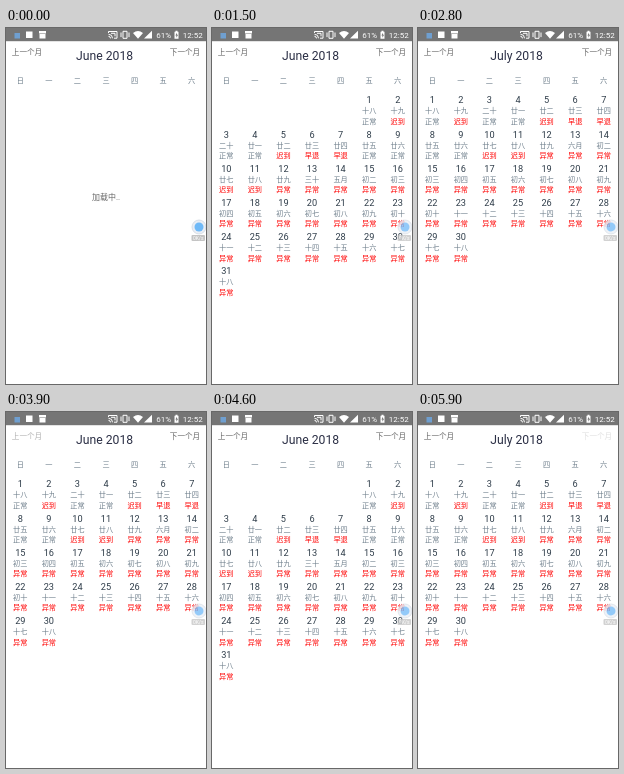
These frames come from a looping animation (200 px wide and 356 px high, 6000 ms). An HTML page:

```html
<!DOCTYPE html>
<html lang="zh-CN">
<head>
<meta charset="utf-8">
<title>Calendar</title>
<style>
html, body { margin: 0; width: 100%; height: 100%; overflow: hidden; background: #fff; }
svg { display: block; width: 100vw; height: 100vh; }
text { font: 7.2px Roboto, "Noto Sans CJK SC", "Noto Sans CJK", sans-serif; fill: #6f7f8c; text-anchor: middle; }
.bar text { font-size: 8px; fill: #fff; }
text.title { font-size: 12.2px; fill: #2b2f45; }
text.nav { font-size: 7.6px; fill: #666; }
text.wait { font-size: 8px; fill: #666; }
text.day { font-size: 9.2px; fill: #2d3b48; }
text.late { fill: #f00; }
text.speed { font-size: 5px; fill: #fff; }
</style>
</head>
<body>
<svg viewBox="0 0 200 356">
  <g class="bar" fill="#fff">
    <rect width="200" height="13.2" fill="#757575"/>
    <rect x="8.5" y="5" width="5.5" height="5.5" fill="#6f9fd0"/>
    <rect x="20" y="3.5" width="6.5" height="6.5"/>
    <path d="M33 3h7v2.4h-7zM33.5 6h6v4.6h-6z"/>
    <g fill="none" stroke="#fff">
      <path d="M102.5 5V3.5h8.5v6.7h-3M102.5 6.3a4 4 0 0 1 4 4M102.5 8.4a2 2 0 0 1 2 2M105 5.3h4v3"/>
      <path d="M117 3.3h4v7h-4zM115 4.5v4.6M123 4.5v4.6"/>
    </g>
    <path d="M127 5q5-4 10 0l-5 5.8zM146 2.8v7.8h-8zM168.5 3.8h1v-1h2v1h1v7h-4z"/>
    <path d="M171 4.7l-1.6 2.7h1v2.3l1.7-3h-1.1z" fill="#757575"/>
    <text x="157.6" y="9.8">61%</text>
    <text x="186.8" y="9.8">12:52</text>
  </g>
  <text class="nav" id="prev" x="21" y="27">上一个月</text>
  <text class="nav" id="next" x="179" y="27">下一个月</text>
  <text class="title" id="title" x="98.6" y="32"></text>
  <text class="wait" id="wait" x="100" y="172">加载中..</text>
  <g id="week"></g>
  <g id="june"></g>
  <g id="july"></g>
  <g id="ball">
    <circle cx="193" cy="199" r="7" fill="#e9eef5" stroke="#cdd5de" stroke-width=".7"/>
    <circle cx="193" cy="199" r="4.5" fill="#6fb9f7"/>
    <rect x="185.5" y="207" width="13.5" height="6" rx="1" fill="#c4c4c4"/>
    <text class="speed" x="192.2" y="211.8">0K/s</text>
  </g>
</svg>
<script>
const $ = id => document.getElementById(id);
const colX = col => 14.3 + 28.57 * col;

function label(parent, text, x, y, cls = '') {
  const el = document.createElementNS('http://www.w3.org/2000/svg', 'text');
  el.textContent = text;
  el.setAttribute('x', x);
  el.setAttribute('y', y);
  el.setAttribute('class', cls);
  parent.append(el);
}

const digits = '十一二三四五六七八九';

function lunarName(n) {
  if (n === 10) return '初十';
  if (n === 20) return '二十';
  if (n === 30) return '三十';
  return '初十廿'[Math.floor(n / 10)] + digits[n % 10];
}

// The lunar month turns over on day `turn`
function lunar(day, turn, name) {
  if (day === turn) return name;
  return lunarName(day < turn ? day + 17 : day - turn + 1);
}

function status(day) {
  if (day > 11) return '异常';
  if ([2, 5, 10, 11].includes(day)) return '迟到';
  return day === 6 || day === 7 ? '早退' : '正常';
}

function month(id, firstCol, days, turn, name) {
  for (let day = 1; day <= days; day++) {
    const cell = firstCol + day - 1;
    const x = colX(cell % 7), y = 72 + 34.2 * Math.floor(cell / 7);
    const state = status(day);
    label($(id), day, x, y + 3.3, 'day');
    label($(id), lunar(day, turn, name), x, y + 13.4);
    label($(id), state, x, y + 23.8, state === '正常' ? '' : 'late');
  }
}

[...'日一二三四五六'].forEach((d, i) => label($('week'), d, colX(i), 54.6));
month('june', 5, 31, 14, '五月');
month('july', 0, 30, 13, '六月');

// Each entry: [start time, value], held until the following one
const tracks = {
  title: [[0, 'June'], [2300, 'July'], [3900, 'June'], [5300, 'July']],
  grid: [[0, ''], [500, 'june'], [2400, 'july'], [4000, 'june'], [5400, 'july']],
  prev: [[0, 1], [3800, .2], [3900, .5], [4000, 1]],
  next: [[0, 1], [2200, .2], [2300, .5], [2400, 1], [5200, .2], [5300, 1], [5900, .2]]
};
const at = (name, t) => tracks[name].findLast(([start]) => start <= t)[1];
const show = (id, on) => { $(id).style.display = on ? '' : 'none'; };

function draw(now) {
  const t = now % 6000, grid = at('grid', t);
  $('title').textContent = at('title', t) + ' 2018';
  for (const id of ['prev', 'next']) $(id).style.opacity = at(id, t);
  for (const id of ['june', 'july']) show(id, grid === id);
  show('wait', !grid);
  $('ball').style.opacity = grid ? .75 : 1;
  requestAnimationFrame(draw);
}
draw(0);
</script>
</body>
</html>
```
